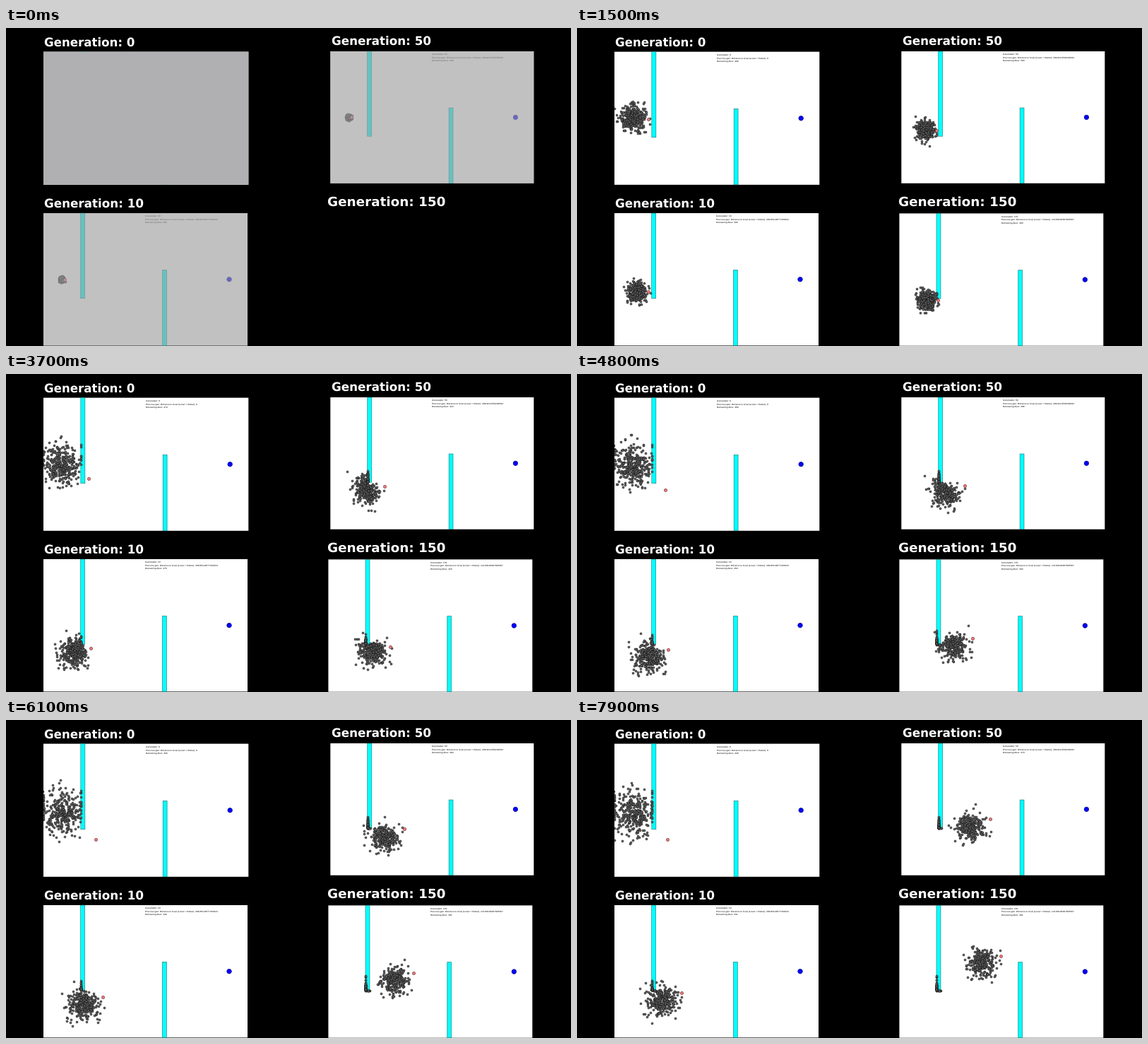
These frames come from a looping animation (800 by 450 pixels, 8000 ms). A matplotlib script:

```python
import numpy as np
import matplotlib.pyplot as plt
from matplotlib.animation import FuncAnimation
from matplotlib.patches import Circle, Rectangle

plt.rcParams["text.hinting"] = "none"

W, H, DPI = 800, 450, 100
FRAMES, STEP = 80, 100
DOTS, POPULATION = 340, 500
PX = 72 / DPI  # points per pixel
TIMES = np.arange(FRAMES) * STEP / 1000

# Course layout, in units of a panel 289 wide
COURSE_W, COURSE_H = 289, 187.4
WALL_TOP = (52.6, 0, 58.6, 120.6)
WALL_LOW = (168.4, 80.3, 174.3, COURSE_H)
GOAL, START, NOTE = (263, 93.7), (26.2, 93.7), (144.2, 5.2)

fig = plt.figure(figsize=(W / DPI, H / DPI), dpi=DPI, facecolor="black")
ax = fig.add_axes([0, 0, 1, 1])
ax.set_xlim(0, W)
ax.set_ylim(H, 0)
ax.axis("off")


def centre_path(reach, ease, dip, swing, skew):
    """Cloud centre: eased run to the right on a sine dip below the wall."""
    x = START[0] + reach * (TIMES / TIMES[-1]) ** ease
    y = START[1] + dip * np.sin(np.pi * (TIMES / swing) ** skew)
    return np.stack([x, y], 1)


def swarm(seed, centre, spread):
    """Gaussian cloud whose dots stop at the first wall or the left edge."""
    rng = np.random.default_rng(seed)
    a, b = np.clip(rng.normal(size=(2, DOTS, 2)), -2.7, 2.7)
    turn = rng.normal(0, 0.4, (DOTS, 1))
    left, _, right, bottom = WALL_TOP
    path = np.zeros((FRAMES, DOTS, 2))
    alive = np.full(FRAMES, POPULATION)
    dead = np.zeros(DOTS, bool)
    last = np.tile(START, (DOTS, 1))
    for k, t in enumerate(TIMES):
        p = centre[k] + spread[k] * (a * np.cos(turn * t) + b * np.sin(turn * t))
        p[dead] = last[dead]
        x, y = p.T
        hit = ~dead & (x > left) & (x < right) & (y < bottom)
        from_left = hit & (last[:, 0] <= left)
        from_below = hit & ~from_left & (last[:, 1] >= bottom)
        p[from_left, 0] = left
        p[from_below, 1] = bottom
        p[hit & ~from_left & ~from_below, 0] = right
        dead |= hit | (x < 0)
        path[k] = last = p
        alive[k] = round(POPULATION * (1 - dead.mean()))
    return path, alive


class Panel:
    def __init__(self, gen, corner, width, title, size, score, route, spread,
                 stray, clear=0):
        self.corner, self.scale, self.clear = np.array(corner), width / COURSE_W, clear
        self.art = []

        area = self.rect((0, 0, COURSE_W, COURSE_H), "white", 1)
        for wall in (WALL_TOP, WALL_LOW):
            self.rect(wall, "cyan", 2, 0.6)
        self.add(ax.add_patch(Circle(self.at(GOAL), 3.3, fc="blue", ec="#000060",
                                     lw=0.5 * PX, zorder=3)))

        ax.text(*title, f"Generation: {gen}", color="white", weight="bold",
                family="DejaVu Sans", size=size * PX)
        self.note(0, f"Generation: {gen}")
        self.note(1, f"Previous gen: Distance to Goal (Lower = Better): {score}")
        self.count = self.note(2, "")

        centre = centre_path(*route)
        sigma = 1.7 + spread * (1 - np.exp(-TIMES / 2))
        path, self.alive = swarm(gen + 7, centre, sigma)
        u = np.clip((TIMES - 2) / 3.5, 0, 1)
        drift = (u * u * (3 - 2 * u))[:, None] * stray
        self.path = self.at(path)
        self.best = self.at(centre + drift + np.outer(sigma, (2.3, 0)))

        self.cloud = self.dots(2.9, "#707070", "#181818", 4, area)
        self.lead = self.dots(4.1, "#f57878", "#603030", 5, area)
        self.veil = self.rect((0, 0, COURSE_W, COURSE_H), "#a0a0a0", 8)

    def at(self, p):
        return self.corner + self.scale * np.asarray(p)

    def add(self, artist):
        self.art.append(artist)
        return artist

    def rect(self, box, color, z, lw=0):
        p, q = self.at(box[:2]), self.at(box[2:])
        return self.add(ax.add_patch(Rectangle(p, *(q - p), fc=color, ec="#207070",
                                               lw=lw * PX, zorder=z, snap=False)))

    def note(self, row, text):
        x, y = self.at(NOTE)
        return self.add(ax.text(x, y + 4.2 * row, text, color="black", zorder=3,
                                family="Liberation Sans", size=3.27 * PX))

    def dots(self, width, fill, edge, z, area):
        s = ax.scatter([], [], s=(width * PX) ** 2, fc=fill, ec=edge,
                       lw=0.6 * PX, zorder=z)
        s.set_clip_path(area)
        return self.add(s)

    def show(self, k):
        n = k - self.clear  # frames since the grey cover began to fade
        for a in self.art:
            a.set_visible(n >= -1)
        self.veil.set_alpha(1 if n < 0 else 0.65 * max(0, 1 - n / 3))
        self.veil.set_facecolor("#b0b0b2" if n < 0 else "#a0a0a0")
        self.cloud.set_offsets(self.path[k])
        self.lead.set_offsets(self.best[k])
        self.count.set_text(f"Remaining Alive: {self.alive[k]}")


# route: reach, ease, dip, swing seconds, skew
panels = [
    Panel(0, (53, 33.6), 290.3, (53.6, 26.5), 16.65, "0",
          (0, 1, 3, 16, 1), 14.5, (12, 38), clear=1),
    Panel(50, (459.3, 33), 288, (461.2, 24.8), 16.75, "209.9213550238293",
          (71, 1.3, 40, 9.8, 1), 9.7, (3, -9)),
    Panel(10, (53, 262), 289, (54.2, 255), 16.75, "209.85149577432024",
          (40, 1.15, 45, 12, 1), 9.7, (3, -9)),
    Panel(150, (456.4, 262.4), 288.9, (455.4, 252.2), 18.4, "122.89198487004567",
          (89, 1.15, 36, 6.9, 0.8), 9.7, (3, -9), clear=2),
]


def draw(k):
    for panel in panels:
        panel.show(k)
    return []


anim = FuncAnimation(fig, draw, frames=FRAMES, interval=STEP, repeat=True,
                     repeat_delay=0, blit=False)
plt.show()
```
